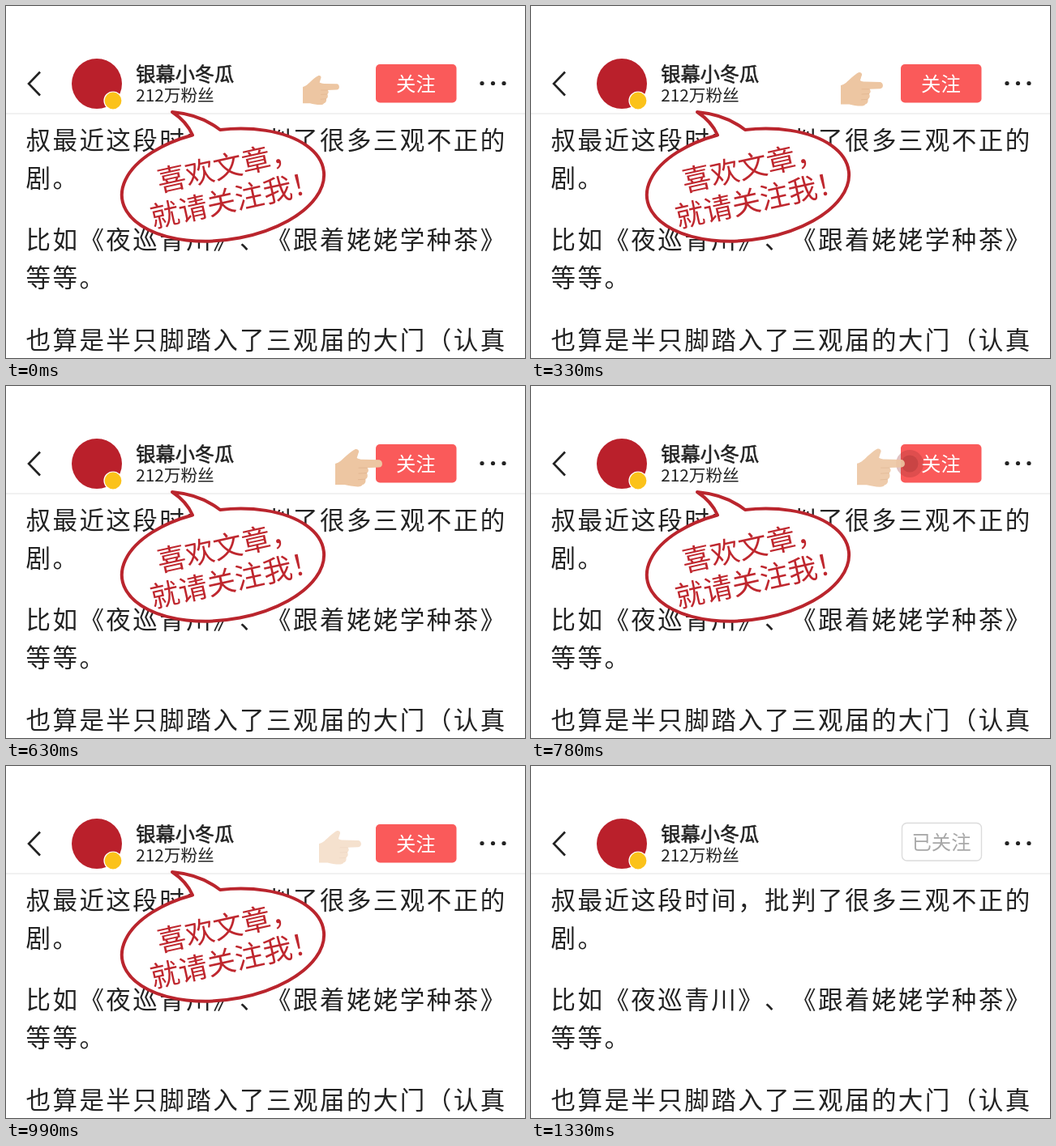
Write an HTML page that moves like this. It is 640 px wide and 435 px high and loops after 2.03 s.

```html
<!DOCTYPE html>
<html lang="zh-CN">
<head>
<meta charset="utf-8">
<title>关注</title>
<style>
html, body { margin: 0; width: 100%; height: 100%; overflow: hidden; background: #fff; }
svg { display: block; width: 640px; height: 435px; }
text {
  font-family: "Noto Sans CJK SC", "Noto Sans CJK", "Noto Sans", sans-serif;
  fill: #222;
  text-spacing-trim: space-all;
}
.body text { font-size: 30.5px; letter-spacing: 2.45px; }
.name { font-size: 24.2px; stroke: #222; stroke-width: .6px; }
.label { font-size: 24.4px; text-anchor: middle; }
.shout { font-size: 35.6px; fill: #bf272e; }
</style>
</head>
<body>
<svg viewBox="0 0 640 435">
  <rect width="640" height="435" fill="#fff"/>
  <g class="body">
    <text x="24.5" y="177">叔最近这段时间，批判了很多三观不正的</text>
    <text x="24.5" y="223.5">剧。</text>
    <text x="24.5" y="300">比如《夜巡青川》、《跟着姥姥学种茶》</text>
    <text x="24.5" y="347">等等。</text>
    <text x="24.5" y="423.5">也算是半只脚踏入了三观届的大门（认真</text>
  </g>

  <path d="M0 133H640" stroke="#e4e4e4" stroke-width="1.2"/>
  <path d="M42 81.500L28 96L42 110.500" fill="none" stroke="#222" stroke-width="2.6"/>
  <circle cx="112" cy="96" r="31" fill="#ba202b"/>
  <circle cx="132" cy="117" r="11" fill="#fbc21a" stroke="#fff" stroke-width="1.2"/>
  <text class="name" x="160.300" y="93">银幕小冬瓜</text>
  <text x="160.300" y="118" font-size="20.7">212万粉丝</text>
  <g fill="#222">
    <circle cx="587" cy="95.500" r="2.6"/>
    <circle cx="600.500" cy="95.500" r="2.6"/>
    <circle cx="614" cy="95.500" r="2.6"/>
  </g>

  <g id="before">
    <rect x="456" y="72" width="99.500" height="47.500" rx="5" fill="#fa5a5a"/>
    <text class="label" x="505.500" y="105" style="fill:#fff">关注</text>
    <path d="M230 159.500A125.500 68 -8 1 0 264 153Q240 134 205 131Q223 143 230 159.500Z"
      fill="#fff" stroke="#ba252d" stroke-width="4" stroke-linejoin="round"/>
    <text class="shout" transform="translate(189.500 230) rotate(-12.500)">喜欢文章，</text>
    <text class="shout" transform="translate(181.200 274.600) rotate(-12.500)">就请关注我！</text>
    <g id="ripple" fill="#a03434">
      <circle id="outer" cx="467" cy="96" opacity=".3"/>
      <circle id="inner" cx="467" cy="96" opacity=".35"/>
    </g>
    <g id="hand">
      <path fill="#edc6a2" d="M0 31C10 29 16 21 24 14C32 7 38 2 43 0C49 -1 52 4 49 9L46 19
        C49 21 54 22 58 22L94 23C102 25 102 39 93 39L68 40C72 43 71 49 67 51C70 55 69 62 64 64
        C66 69 63 75 58 76C57 79 53 80 48 80C38 80 28 78 20 76L0 76Z"/>
      <path fill="none" stroke="#d9ab84" stroke-width="1.6" stroke-linecap="round" opacity=".6"
        d="M68 40L50 40M67 51L50 52M64 64L49 65"/>
    </g>
  </g>

  <g id="after">
    <rect x="457.500" y="70.500" width="98" height="46.500" rx="6" fill="#fff" stroke="#dcdcdc" stroke-width="1.4"/>
    <text class="label" x="506" y="103" style="fill:#a8a8a8">已关注</text>
  </g>
</svg>
<script>
const LOOP = 2030, STEP = 30, LAST_MOVE = 1230, FOLLOWED = 1330;
const $ = id => document.getElementById(id);
const [before, after, hand, ripple, outer, inner] =
  ["before", "after", "hand", "ripple", "outer", "inner"].map($);

// time, left, top, width, opacity
const poses = [
  [0, 366, 86, 45, 1],
  [330, 382, 82, 52, 1],
  [540, 392, 79.5, 56.5, 1],
  [630, 406, 78, 58, 1],
  [690, 408, 76.5, 60.5, 1],
  [780, 402, 77.5, 59, 0.9],
  [990, 386, 80, 52, 0.52],
  [1230, 370, 83, 49, 0.25]
];

const clamp = v => Math.max(0, Math.min(1, v));

function poseAt(t) {
  const i = Math.max(1, poses.findIndex(p => p[0] >= t));
  const a = poses[i - 1], b = poses[i];
  const k = clamp((t - a[0]) / (b[0] - a[0]));
  return a.map((v, j) => v + (b[j] - v) * k);
}

function draw(ms) {
  const followed = ms >= FOLLOWED;
  before.style.display = followed ? "none" : "";
  after.style.display = followed ? "" : "none";
  if (followed) return;

  const t = Math.min(LAST_MOVE, Math.floor(ms / STEP) * STEP);
  const [, x, y, w, alpha] = poseAt(t);
  hand.setAttribute("transform", `translate(${x} ${y}) scale(${w / 100})`);
  hand.setAttribute("opacity", alpha);

  const grow = clamp((t - 690) / 90);
  outer.setAttribute("r", 17 * grow);
  inner.setAttribute("r", 10.5 * grow);
  ripple.setAttribute("opacity", clamp((930 - t) / 150));
}

function tick(now) {
  draw(now % LOOP);
  requestAnimationFrame(tick);
}
draw(0);
requestAnimationFrame(tick);
</script>
</body>
</html>
```
